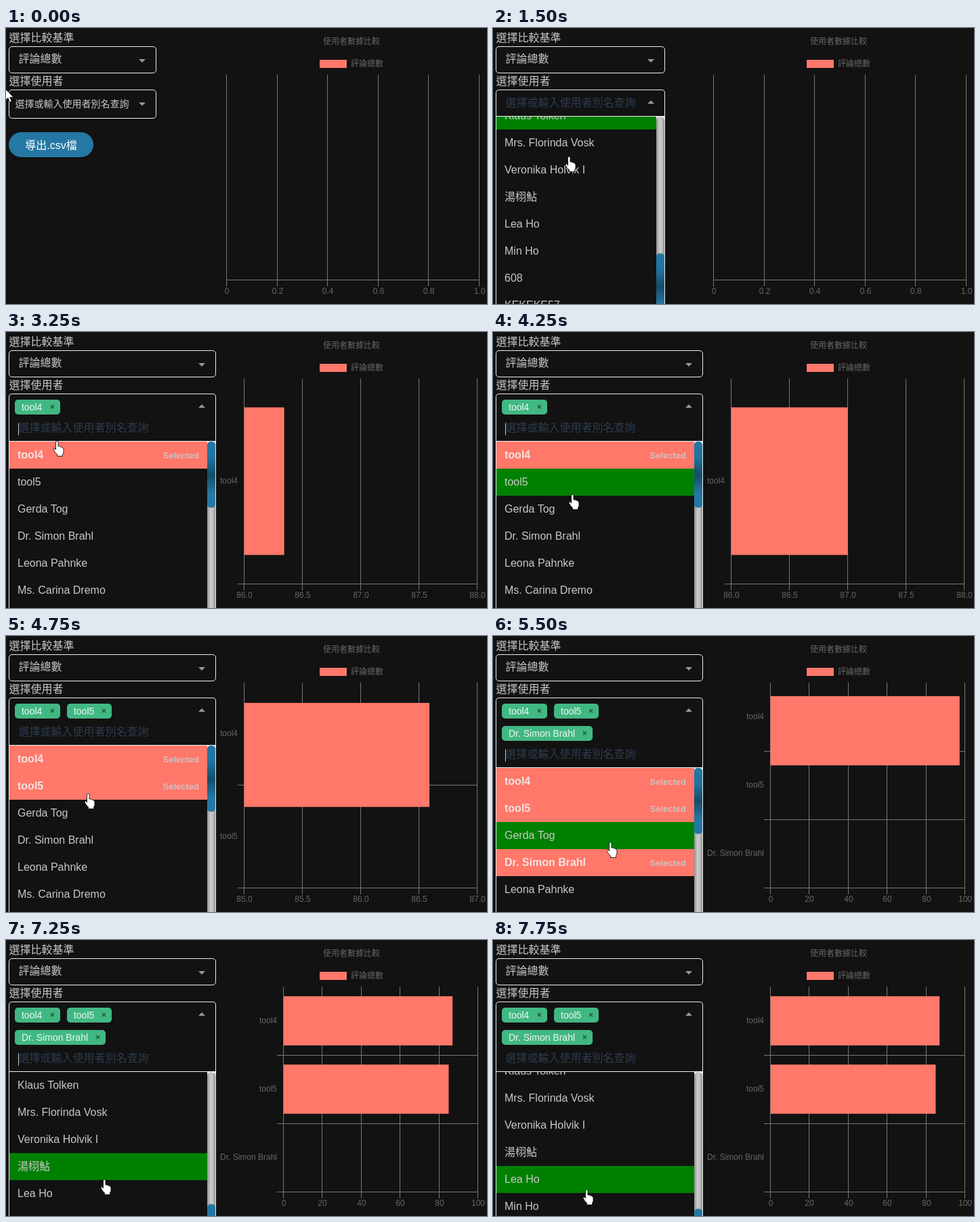
These frames come from a looping animation (710 px wide and 408 px high, 8000 ms). An HTML page:

```html
<!DOCTYPE html>
<html lang="zh-Hant">
<head>
<meta charset="utf-8">
<title>使用者數據比較</title>
<style>
html, body { margin: 0; width: 100%; height: 100%; overflow: hidden; background: #121212; }
svg { display: block; width: 710px; height: 408px; }
text { font-family: "Liberation Sans", Arial, "Noto Sans CJK TC", "Noto Sans CJK JP", sans-serif; white-space: pre; }
</style>
</head>
<body>
<svg id="stage" viewBox="0 0 710 408">
  <defs>
    <linearGradient id="thumb" x1="0" y1="0" x2="0" y2="1">
      <stop offset="0" stop-color="#2478a3"/><stop offset=".25" stop-color="#2273a0"/>
      <stop offset=".5" stop-color="#174b66"/><stop offset=".78" stop-color="#2478a3"/>
      <stop offset="1" stop-color="#2478a3"/>
    </linearGradient>
    <linearGradient id="track">
      <stop offset="0" stop-color="#8e8e8e"/><stop offset=".35" stop-color="#c6c6c6"/>
      <stop offset=".65" stop-color="#c6c6c6"/><stop offset="1" stop-color="#8e8e8e"/>
    </linearGradient>
    <clipPath id="listClip"><rect id="listBox" x="0" width="320" height="300"/></clipPath>
    <clipPath id="plotClip"><rect id="plotBox" y="69" height="304"/></clipPath>
  </defs>
  <g id="chart"></g>
  <g id="form"></g>
  <path id="cursor" stroke="#000" stroke-width=".8" stroke-linejoin="round" fill="#fff"/>
</svg>
<script>
const LOOP = 8000, STEP = 250;
const CORAL = '#ff786a', LIGHT = '#c8c8c8', EDGE = '#ececec', GRID = '#777', DIM = '#666';
const ROW = 40, LIST_H = 300;
const HINT = '選擇或輸入使用者別名查詢';
const people = ['tool4', 'tool5', 'Gerda Tog', 'Dr. Simon Brahl', 'Leona Pahnke', 'Ms. Carina Dremo',
  'Dr. Rosalie Tenbog PhD', 'Hedda Polvin', 'Mr. Orlan Tesk', 'Wilma Druhn', 'Prof. Ilka Sorven', 'Nils Garbeck',
  'Thomas Strok', 'Clement Dolvig', 'Una McTurbel', 'Klaus Tolken', 'Mrs. Florinda Vosk', 'Veronika Holvik I',
  '湯栩鮎', 'Lea Ho', 'Min Ho', '608', 'KEKEKE57'];
const picked = [0, 1, 3], values = [87, 85, 0];
const pickTimes = [3150, 4550, 5450];
const OPEN_AT = 500;

// step, pointer x, pointer y, list scroll
const keys = [
  [0, -1, 90, 0], [1, 45, 104, 0], [2, 105, 112, 0], [3, 112, 150, 0], [4, 112, 191, 200],
  [5, 112, 191, 550], [6, 112, 191, 621], [7, 110, 194, 621], [10, 85, 200, 0], [11, 73, 198, 0],
  [12, 73, 165, 0], [13, 75, 162, 0], [16, 108, 215, 0], [17, 117, 241, 0], [18, 119, 232, 0],
  [19, 121, 234, 0], [20, 135, 262, 0], [21, 165, 300, 0], [22, 173, 306, 0], [23, 173, 306, 0],
  [24, 173, 305, 200], [25, 173, 305, 500], [27, 173, 305, 500], [28, 160, 330, 560],
  [29, 145, 355, 600], [30, 138, 368, 610], [31, 138, 370, 621]];

// plot edges and value ticks for 0 to 3 picked users
const scales = [
  { left: 325.5, right: 698.5, min: 0, max: 1, tick: .2, digits: 1 },
  { left: 351.5, right: 695.5, min: 86, max: 88, tick: .5, digits: 1 },
  { left: 351.5, right: 695.5, min: 85, max: 87, tick: .5, digits: 1 },
  { left: 409.5, right: 696.5, min: 0, max: 100, tick: 20, digits: 0 }];
const TOP = 69, BOTTOM = 372;

const HAND = 'M-1.5 1Q-1.5-1 .3-1 2-1 2 1V7Q4.4 6 5.4 8 7.4 7 8 9 10.4 9 10 12V15Q10 17 8.6 18.5V21.5H.5V19Q-3 16-5 11.5-4.5 9-2.8 10L-1.5 12Z';
const ARROW = 'M0 0V17L4 13.4 6.6 19.6 9.4 18.4 6.8 12.4H12Z';

const $ = id => document.getElementById(id);
const mix = (a, b, p) => a + (b - a) * p;

function rect(x, y, w, h, fill, extra = '') {
  return `<rect x="${x}" y="${y}" width="${w}" height="${h}" fill="${fill}" ${extra}/>`;
}
function text(str, x, y, size, fill, extra = '') {
  return `<text x="${x}" y="${y}" font-size="${size}" fill="${fill}" ${extra}>${str}</text>`;
}
function path(d, stroke, extra = '') {
  return `<path d="${d}" stroke="${stroke}" fill="none" ${extra}/>`;
}
function pose(step) {
  let i = 0;
  while (i < keys.length - 2 && keys[i + 1][0] <= step) i++;
  const a = keys[i], b = keys[i + 1];
  const p = Math.max(0, (step - a[0]) / (b[0] - a[0]));
  return { x: mix(a[1], b[1], p), y: mix(a[2], b[2], p), scroll: mix(a[3], b[3], p) };
}

function barAt(n, i) {
  const s = scales[n], slot = (BOTTOM - TOP) / n;
  const end = mix(s.left, s.right, (values[i] - s.min) / (s.max - s.min));
  return { base: s.left, end, mid: TOP + slot * (i + .5), h: slot * .72 };
}

function drawChart(n, t) {
  const s = scales[n], count = Math.round((s.max - s.min) / s.tick);
  let out = text('使用者數據比較', 510, 24, 12, DIM, 'text-anchor="middle"')
    + rect(463, 47, 40, 12, CORAL) + text('評論總數', 509, 57, 12, DIM);
  let grid = '';
  for (let i = 0; i <= count; i++) {
    const x = Math.floor(mix(s.left, s.right, i / count)) + .5;
    const v = s.min + i * s.tick;
    grid += `M${x} ${TOP}V382`;
    out += text(v ? v.toFixed(s.digits) : '0', x + .5, 393, 12, DIM, 'text-anchor="middle"');
  }
  const slot = (BOTTOM - TOP) / (n || 1);
  for (let i = 1; i <= (n || 1); i++) {
    grid += `M${n ? s.left - 9.5 : s.left} ${Math.floor(TOP + slot * i) + .5}H${s.right}`;
  }
  out += path(grid, GRID);
  const run = n ? Math.min(1, (t - pickTimes[n - 1]) / 1000) : 1;
  const p = 1 - (1 - run) ** 4;
  let bars = '';
  for (let i = 0; i < n; i++) {
    const to = barAt(n, i);
    const from = i < n - 1 ? barAt(n - 1, i) : { ...to, end: to.base };
    const [base, end, mid, h] = ['base', 'end', 'mid', 'h'].map(k => mix(from[k], to[k], p));
    bars += rect(base, mid - h / 2, Math.max(0, end - base), h, CORAL);
    out += text(people[picked[i]], s.left - 9.5, TOP + slot * (i + .5) + 3.5, 12, DIM, 'text-anchor="end"');
  }
  $('plotBox').setAttribute('x', s.left);
  $('plotBox').setAttribute('width', s.right - s.left);
  $('chart').innerHTML = out + `<g clip-path="url(#plotClip)">${bars}</g>`;
}

function caretMark(x, y, up) {
  const d = up ? -2.5 : 2.5;
  return `<path d="M${x - 5} ${y - d}H${x + 5}L${x} ${y + d}Z" fill="#999"/>`;
}

function drawTags(n) {
  const spots = [[13, 100, 67], [90, 100, 66], [13, 133, 134]];
  return spots.slice(0, n).map(([x, y, w], i) => {
    const cx = x + w - 11.5, cy = y + 10.5;
    return rect(x, y, w, 22, '#41b883', 'rx="5"')
      + text(people[picked[i]], x + 10, y + 16, 14, '#eef6f2')
      + path(`M${cx - 2.5} ${cy - 2.5}l5 5m0-5l-5 5`, '#1f5a40', 'stroke-width="1.6"');
  }).join('');
}

function drawList(top, right, scroll, hover, n) {
  const w = right - 18, bar = right - 13;
  let rows = rect(5, top, w, LIST_H, '#121212');
  people.forEach((name, i) => {
    const y = top + i * ROW - scroll;
    if (y < top - ROW || y > 408) return;
    const on = picked.slice(0, n).includes(i);
    if (on || i === hover) rows += rect(5, y, w, ROW, on ? CORAL : '#008000');
    rows += text(name, 17, y + 25, 16, on ? '#f1e4e2' : LIGHT, on ? 'font-weight="bold"' : '');
    if (on) rows += text('Selected', right - 25, y + 24.5, 13, '#d0c2c0', 'text-anchor="end" font-weight="bold"');
  });
  const ratio = LIST_H / (people.length * ROW + 1);
  rows += rect(bar, top, 12, LIST_H, '#f1f1f1')
    + rect(bar, top, 12, LIST_H, 'url(#track)', 'rx="6"')
    + rect(bar, top + scroll * ratio, 12, LIST_H * ratio, 'url(#thumb)', 'rx="5"');
  $('listBox').setAttribute('y', top);
  return `<g clip-path="url(#listClip)">${rows}</g>`
    + path(`M4.5 408V${top - .5}H${right - .5}V408`, EDGE);
}

function drawForm(n, t, cur, lastScroll) {
  const open = t >= OPEN_AT;
  const right = !open ? 222 : n ? 310 : 254;
  const top = [131, 162, 162, 195][n];
  let out = text('選擇比較基準', 4.5, 20, 16, LIGHT)
    + rect(4.5, 27.5, right - 5, 39, 'none', `rx="4.5" stroke="${EDGE}"`)
    + text('評論總數', 18.5, 51, 16, LIGHT) + caretMark(right - 21, 48.5, false)
    + text('選擇使用者', 4.5, 83.5, 16, LIGHT);
  if (!open) {
    out += rect(4.5, 91.5, right - 5, 42, 'none', `rx="4.5" stroke="${EDGE}"`)
      + text(HINT, 13.5, 117, 14, LIGHT) + caretMark(right - 21, 112.5, false)
      + rect(4, 154, 125, 37, '#2478a3', 'rx="18.5"')
      + text('導出.csv檔', 66.5, 178.5, 16, '#fff', 'text-anchor="middle"');
  } else {
    const base = top - 15.5, beat = t % 1000;
    const blink = n ? beat >= 250 && beat < 750 : beat < 500;
    const hover = Math.max(0, Math.floor((cur.y - top + lastScroll) / ROW));
    out += path(`M4.5 ${top}V96Q4.5 91.5 9 91.5H${right - 5}Q${right - .5} 91.5 ${right - .5} 96V${top}`, EDGE)
      + drawTags(n) + text(HINT, 18.5, base, 16, '#2c3c4e') + caretMark(right - 21, 109.5, true)
      + (blink ? rect(18, base - 12, 1, 18, LIGHT) : '')
      + drawList(top, right, cur.scroll, hover, n);
  }
  $('form').innerHTML = out;
}

let shown = -1;
function render(now) {
  const step = Math.floor(now % LOOP / STEP);
  if (step !== shown) {
    shown = step;
    const t = step * STEP, cur = pose(step);
    const n = pickTimes.filter(p => p <= t).length;
    drawChart(n, t);
    drawForm(n, t, cur, pose(Math.max(0, step - 1)).scroll);
    $('cursor').setAttribute('d', t < OPEN_AT ? ARROW : HAND);
    $('cursor').setAttribute('transform', `translate(${cur.x} ${cur.y})`);
  }
}
const start = performance.now();
function tick() {
  render(performance.now() - start);
  requestAnimationFrame(tick);
}
tick();
</script>
</body>
</html>
```
